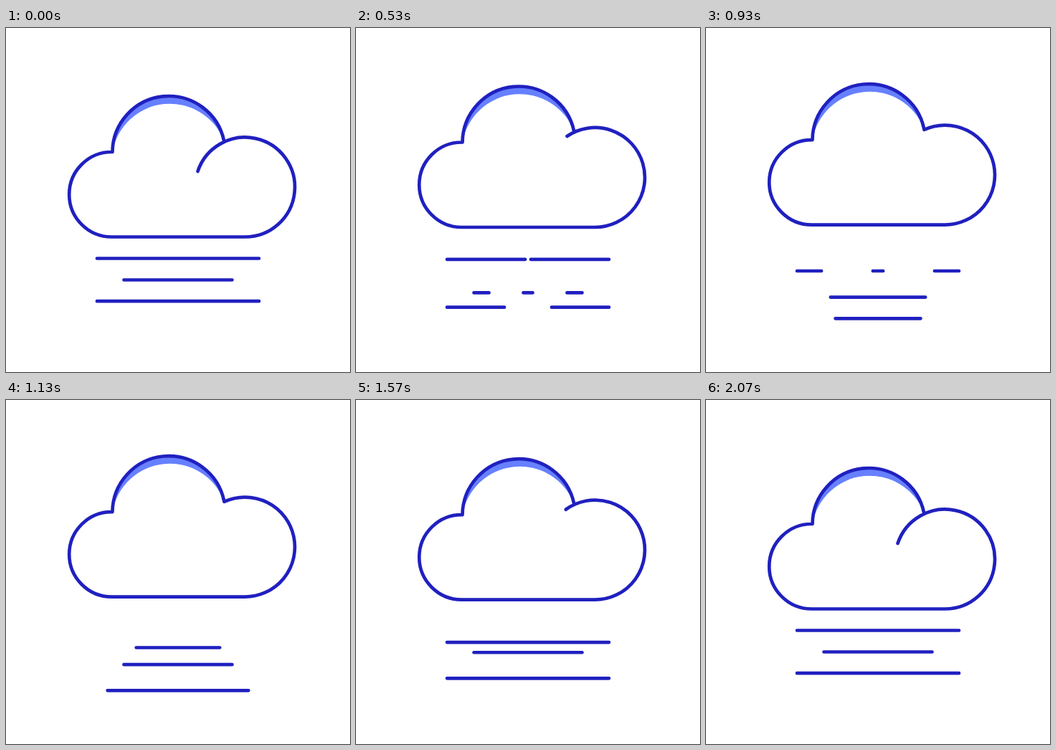
Write an HTML page that moves like this. It is 480 by 480 pixels and loops after 2.1 s.

```html
<!DOCTYPE html>
<html lang="en">
<head>
<meta charset="utf-8">
<title>Fog cloud</title>
<style>
  html, body { margin: 0; width: 100%; height: 100%; overflow: hidden; background: #fff; }
  svg { display: block; width: 100%; height: 100%; }
  .line { fill: none; stroke: #2020c0; stroke-width: 4.7; stroke-linecap: round; stroke-linejoin: round; }
  .shade { fill: #6680ff; }
</style>
</head>
<body>
<svg viewBox="0 0 480 480">
  <g id="cloud">
    <path class="shade" d="M148.5 173A78.7 78.7 0 0 1 304.2 157.5A81.2 81.2 0 0 0 148.5 173Z"/>
    <path class="line" id="outline"/>
  </g>
  <path class="line" id="fog"/>
</svg>
<script>
const LOOP = 2100, STEP = LOOP / 63;
const cloud = document.getElementById('cloud');
const outline = document.getElementById('outline');
const fog = document.getElementById('fog');

// Fog lines: height, half length, delay
const LINES = [
  { y: 321.5, half: 113, delay: 410 },
  { y: 351.5, half: 75.5, delay: 0 },
  { y: 381.2, half: 113, delay: 205 }
];
const CENTER = 240, DROP = 25, DROP_TIME = 830;
const WIPE_START = 20, WIPE_TIME = 1110, GAP = 0.635;

const clamp = v => Math.min(1, Math.max(0, v));
const sineEase = v => Math.sin(clamp(v) * Math.PI / 2) ** 2;

// cubic-bezier(.4, 0, .2, 1)
function glide(x) {
  let lo = 0, hi = 1;
  for (let i = 0; i < 30; i++) {
    const u = (lo + hi) / 2, w = 1 - u;
    if (1.2 * w * w * u + 0.6 * w * u * u + u ** 3 < x) lo = u; else hi = u;
  }
  return lo * lo * (3 - 2 * lo);
}

function drawCloud(t) {
  const p = glide(clamp(1 - Math.abs(t / 1035 - 1)));
  const a = (198.4 + 47.2 * p) * Math.PI / 180;
  const x = 333.5 + 69.5 * Math.cos(a), y = 222 + 69.5 * Math.sin(a);
  cloud.setAttribute('transform', `translate(0 ${-17 * p})`);
  outline.setAttribute('d', 'M304.2 157.5A78.7 78.7 0 0 0 148.5 173' +
    'A59.3 59.3 0 0 0 88.2 232.2A59.3 59.3 0 0 0 147.5 291.5H333.5' +
    `A69.5 69.5 0 1 0 ${x} ${y}`);
}

function fogPath({ y, half, delay }, t) {
  const s = t - delay;
  const top = y + DROP * sineEase(1 - Math.abs(s / DROP_TIME - 1));
  const front = (1 + GAP) * sineEase((s - WIPE_START) / WIPE_TIME);
  const inner = (front - GAP) * half, outer = front * half;
  const span = (a, b) => `M${CENTER + a} ${top}H${CENTER + b}`;
  let d = '';
  if (front < 1) d += span(-half, -outer) + span(outer, half);
  if (inner > 0) d += span(-inner, inner);
  return d;
}

function draw() {
  const now = (performance.now() - start) % LOOP;
  const t = Math.floor((now + 4) / STEP) * STEP % LOOP;
  drawCloud(t);
  fog.setAttribute('d', LINES.map(l => fogPath(l, t)).join(''));
  requestAnimationFrame(draw);
}

const start = performance.now();
draw();
</script>
</body>
</html>
```
